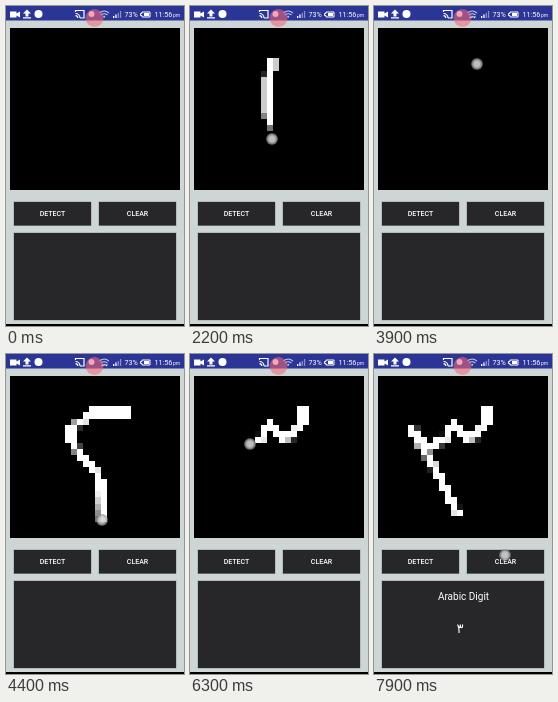
An HTML page with a canvas that plays this animation: 178 px wide and 320 px high, repeating every 8 s.

```html
<!DOCTYPE html>
<html lang="en">
<head>
<meta charset="utf-8">
<title>Arabic digit detector</title>
<style>
html, body { margin: 0; width: 100%; height: 100%; overflow: hidden; background: #ced6d5; }
svg, #pad, #dot { position: absolute; }
svg { left: 0; top: 0; }
text { font-family: Roboto, Arial, sans-serif; fill: #fff; }
#pad { left: 4px; top: 22px; width: 170px; height: 162px; overflow: hidden; background: #000; }
canvas { display: block; width: 170px; height: 170px; image-rendering: pixelated; }
#dot {
  width: 12px; height: 12px; margin: -6px 0 0 -6px; border-radius: 50%;
  background: radial-gradient(circle closest-side, #d2d2d2e6 45%, #a8a8a8d0 75%, #70707090);
}
</style>
</head>
<body>
<svg width="178" height="320" viewBox="0 0 178 320">
  <rect width="178" height="14.5" fill="#2a3596"/>
  <rect y="318" width="178" height="2" fill="#000"/>
  <g fill="#272628" stroke="#272628" stroke-opacity=".3">
    <rect x="8" y="196" width="77" height="23.5"/>
    <rect x="93" y="196" width="77" height="23.5"/>
    <rect x="8" y="227" width="162" height="87"/>
  </g>
  <g font-size="7" font-weight="500" text-anchor="middle">
    <text x="46.5" y="210.2">DETECT</text>
    <text x="131.5" y="210.2">CLEAR</text>
  </g>
  <g id="result" text-anchor="middle">
    <text x="89.5" y="246" font-size="10">Arabic Digit</text>
    <text id="digit" x="86" y="278.5" font-size="13" style="font-family: 'DejaVu Sans', sans-serif"></text>
  </g>
  <!-- status bar -->
  <g fill="#fff">
    <path d="M4 5.5h6.5v2l3.5-2v6l-3.5-2v2H4z"/>
    <path d="M21 3.5l4 4h-2.5v3h-3v-3H17zM17 11.2h8v1.3h-8z"/>
    <circle cx="32.5" cy="8" r="4"/>
    <path d="M69.5 6V4.5h8.5v7.5h-4M69.5 7.5a4.5 4.5 0 0 1 4.5 4.5M69.5 9.7a2.3 2.3 0 0 1 2.3 2.3" fill="none" stroke="#fff" stroke-width="1.2"/>
    <circle cx="85.5" cy="8" r="3"/>
    <path d="M93.5 7q4.7-4 9.4 0M95 9q3.2-2.6 6.4 0" fill="none" stroke="#c3cbe6" stroke-width="1.1"/>
    <circle cx="98.2" cy="10.7" r="1" fill="#c3cbe6"/>
    <path id="arrows" d="M95 12l1.5-2 1.5 2zM99 10.5h3l-1.5 2z"/>
    <path d="M107 10h1.3v2H107zM109.3 8.5h1.3V12h-1.3z"/>
    <path d="M111.6 7h1.3v5h-1.3zM113.9 5h1.3v7h-1.3z" opacity=".45"/>
    <path d="M134.5 7.5h1.5V6h8v5h-8V9.5h-1.5z" fill="none" stroke="#fff"/>
    <path d="M138 7h5v3h-5z"/>
    <text x="118.5" y="11" font-size="7.2">73%</text>
    <text x="148.5" y="11" font-size="7.2">11:56</text>
    <text x="167" y="11" font-size="5">pm</text>
  </g>
  <circle cx="88.5" cy="12" r="9" fill="#f2687a" opacity=".58"/>
</svg>
<div id="pad"><canvas id="grid" width="28" height="28"></canvas></div>
<div id="dot"></div>
<script>
const LOOP = 8000, STEP = 100, LAG = 60, GRID = 28, CELL = 170 / GRID;
const DETECT_AT = [55, 206.5], CLEAR_AT = [131, 200.5];
const $ = id => document.getElementById(id);
const ctx = $('grid').getContext('2d');
const clamp = v => Math.min(1, Math.max(0, v));

// Paths are key points in grid cells; the finger follows them by arc length
const rounds = [
  { digit: '١', start: 2000, end: 2400, lift: 2500, detect: 2800, clear: 3300, ease: 1.5,
    path: [[12.9, 5.4], [12.9, 6.5], [12.1, 8], [12.1, 14], [12.9, 19], [12.85, 21.6]] },
  { digit: '٢', start: 3900, end: 4390, lift: 4600, detect: 4800, clear: 5300, ease: 1,
    path: [[19.6, 6], [13.5, 6], [10, 8.7], [10, 10.8], [14.4, 16.3], [15, 17.5], [15.2, 23.7]] },
  { digit: '٣', start: 5900, end: 7000, lift: 7100, detect: 7200, clear: 7900, ease: 1,
    path: [[18, 5.4], [18, 7.5], [16.2, 9.8], [14.5, 10], [12.3, 7.8], [10.8, 10.6],
           [8, 11.6], [5.7, 8.7], [13.1, 22.4]] }
];

// The part of the path drawn by time t
function drawnPath({ path, start, end, ease }, t) {
  const lengths = path.slice(1).map(([x, y], i) => Math.hypot(x - path[i][0], y - path[i][1]));
  const total = lengths.reduce((sum, n) => sum + n);
  let left = total * (1 - (1 - clamp((t - start) / (end - start))) ** ease);
  const drawn = [path[0]];
  for (let i = 0; i < lengths.length && left > 0; i++) {
    const k = Math.min(1, left / lengths[i]);
    drawn.push(path[i].map((v, axis) => v + (path[i + 1][axis] - v) * k));
    left -= lengths[i];
  }
  return drawn;
}

function distance(x, y, [ax, ay], [bx, by]) {
  const dx = bx - ax, dy = by - ay;
  const k = clamp(((x - ax) * dx + (y - ay) * dy) / (dx * dx + dy * dy || 1));
  return Math.hypot(x - ax - dx * k, y - ay - dy * k);
}

// Cells near the path are white, with a narrow grey falloff
function drawStroke(points) {
  ctx.fillStyle = '#fff';
  for (let row = 0; row < GRID; row++) {
    for (let col = 0; col < GRID; col++) {
      const gaps = points.slice(1).map((p, i) => distance(col + .5, row + .5, points[i], p));
      ctx.globalAlpha = clamp((.8 - Math.min(...gaps)) / .25);
      ctx.fillRect(col, row, 1, 1);
    }
  }
}

function touchAt(round, t) {
  if (t < round.lift) {
    const [x, y] = drawnPath(round, t + LAG).at(-1);
    return [4 + x * CELL, 22 + y * CELL];
  }
  if (t >= round.detect && t < round.detect + 300) return DETECT_AT;
  if (t >= round.clear && t < round.clear + 400) return CLEAR_AT;
}

function render(t) {
  const round = rounds.findLast(r => t >= r.start);
  const filled = round && t < round.clear + 200;
  const answered = filled && t >= round.detect + 200;
  const touch = round && touchAt(round, t);

  ctx.clearRect(0, 0, GRID, GRID);
  if (filled) drawStroke(drawnPath(round, t));
  $('result').style.display = answered ? '' : 'none';
  if (answered) $('digit').textContent = round.digit;
  $('dot').style.display = touch ? '' : 'none';
  if (touch) {
    $('dot').style.left = touch[0] + 'px';
    $('dot').style.top = touch[1] + 'px';
  }
  $('arrows').style.display = round === rounds[1] ? '' : 'none';
}

const begin = performance.now();
function tick() {
  const t = (performance.now() - begin) % LOOP;
  render(Math.floor(t / STEP) * STEP);
  requestAnimationFrame(tick);
}
tick();
</script>
</body>
</html>
```
